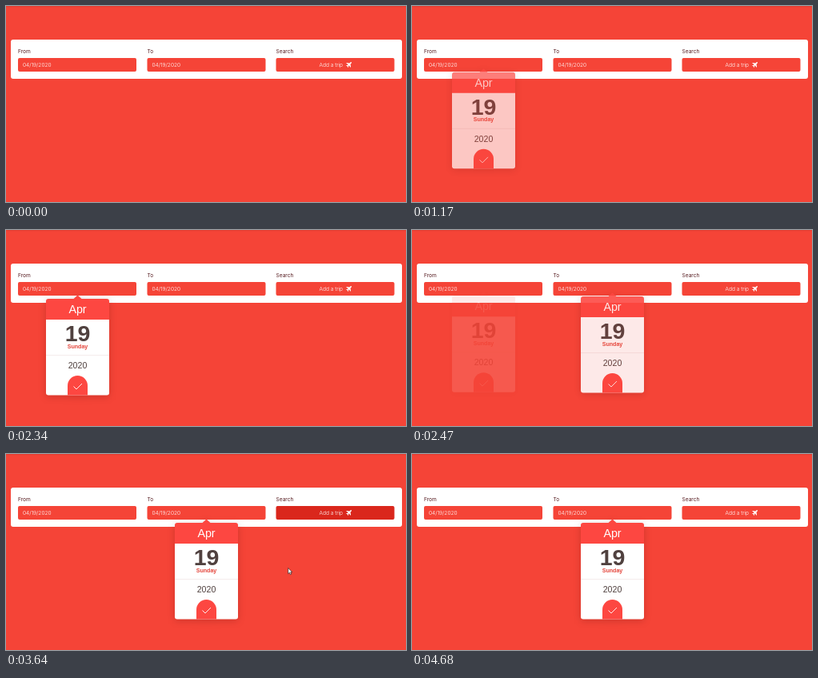
Recreate the animation shown at these times as an HTML page. Size 500 by 245 pixels, loop 5460 ms.

```html
<!DOCTYPE html>
<html lang="en">
<head>
<meta charset="utf-8">
<title>Trip search</title>
<style>
  html, body { margin: 0; width: 100%; height: 100%; overflow: hidden; background: #f54437; }
  svg { display: block; width: 100%; height: 100%; }
  .form { font: 300 6.6px Inter, sans-serif; }
  .label { fill: #561c20; font-weight: 400; }
  .field { fill: #f54437; }
  .value { fill: #fff; }
  .card { font-family: "Liberation Sans", Arial, sans-serif; text-anchor: middle;
    filter: drop-shadow(0 2px 5px rgba(60, 0, 0, .2)); }
  .accent { fill: #fd4741; }
  .ink { fill: #50413f; }
</style>
</head>
<body>
<svg viewBox="0 0 500 245">
  <defs>
    <linearGradient id="edge" x2="0" y2="1">
      <stop stop-color="#dd3c31"/>
      <stop offset="1" stop-color="#f54437"/>
    </linearGradient>
  </defs>
  <rect width="500" height="245" fill="#f54437"/>
  <rect width="500" height="2" fill="url(#edge)"/>
  <rect x="6" y="42" width="489" height="49" rx="3" fill="#fff"/>
  <g class="form" id="form"></g>
  <path fill="#fff" transform="translate(429 73) rotate(-45)"
    d="M4 0Q4-.8 2.7-.8H1.3L-.7-3.6H-1.7L-.9-.8H-2.3L-3.1-1.8H-3.8L-3.3 0L-3.8 1.8H-3.1L-2.3.8H-.9L-1.7 3.6H-.7L1.3.8H2.7Q4 .8 4 0Z"/>
  <g id="cards"></g>
  <g fill="#fff" stroke="#3a2222" stroke-width=".7" stroke-linejoin="round">
    <path id="arrow" d="M0 0V7.2L1.7 5.7L2.8 8.2L4.1 7.6L3 5.2H5.2Z"/>
    <path id="hand" d="M-.7 4.6V.5Q0-.5.7.5V3L3.3 3.6Q4 3.9 3.9 4.7L3.3 8.6H0L-2.3 5.6Q-2.3 4.5-1.5 4.8Z"/>
  </g>
</svg>
<script>
const STEP = 130, LOOP = 5460, FADE = 200;
const OPEN_FROM = 1090, SWITCH = 2350;
const $ = id => document.getElementById(id);

const fields = [[15, "From", "04/19/2020"], [176.5, "To", "04/19/2020"], [337.5, "Search", "Add a trip"]];
$("form").innerHTML = fields.map(([x, label, value], i) => `
  <text class="label" x="${x}" y="59">${label}</text>
  <rect class="field" x="${x}" y="65" width="148" height="17" rx="2"/>
  <text class="value" x="${x + (i === 2 ? 54 : 6)}" y="76">${value}</text>`).join("");
const button = document.querySelectorAll(".field")[2];

function addCard(x) {
  const g = document.createElementNS("http://www.w3.org/2000/svg", "g");
  g.setAttribute("class", "card");
  g.innerHTML = `
    <rect x="-39.5" y="86" width="79" height="120.5" rx="3" fill="#fff"/>
    <path class="accent" d="M-39.5 112V89Q-39.5 86-36.5 86H-5L0 81.5L5 86H36.5Q39.5 86 39.5 89V112Z"/>
    <text y="104" font-size="14.3" fill="#fff">Apr</text>
    <text class="ink" y="139.3" font-size="28.5" font-weight="700">19</text>
    <text y="147.5" font-size="7.1" font-weight="700" fill="#e4453b">Sunday</text>
    <path d="M-39.5 156.5H39.5" stroke="#f1e8e7" stroke-width=".8"/>
    <text class="ink" y="172.7" font-size="10.6">2020</text>
    <path class="accent" d="M-12.5 206.5V194.5A12.5 12.5 0 0 1 12.5 194.5V206.5Z"/>
    <path d="M-5 195.5L-1.5 199L5.5 192" fill="none" stroke="#fff" stroke-width=".9"/>`;
  $("cards").append(g);
  return { g, x };
}
const from = addCard(89.5), to = addCard(250.5);

const clamp = v => Math.max(0, Math.min(1, v));
const fade = (t, start) => 1 - (1 - clamp((t - start) / FADE)) ** 2.36;

function showCard({ g, x }, o) {
  const lift = o < 1 ? 1.2 * o - 4 : 0;
  g.setAttribute("opacity", o);
  g.setAttribute("transform", `translate(${x} ${lift})`);
}

// Each visit of the pointer: shape, then [time, x, y] stops
const visits = [
  ["arrow", [1690, 205, 92], [1820, 231.5, 86.5], [1950, 238, 84]],
  ["hand", [2990, 357, 76.5], [3250, 372, 73], [3510, 372, 73]],
  ["arrow", [3640, 352.7, 142.5], [4160, 356, 185], [4290, 357, 200], [4680, 360, 250]]
];

function showPointer(t) {
  for (const id of ["arrow", "hand"]) $(id).setAttribute("visibility", "hidden");
  for (const [id, ...stops] of visits) {
    const i = stops.findIndex((s, n) => n && t >= stops[n - 1][0] && t <= s[0]);
    if (i < 1) continue;
    const [t0, x0, y0] = stops[i - 1], [t1, x1, y1] = stops[i];
    const k = (t - t0) / (t1 - t0);
    $(id).setAttribute("transform", `translate(${x0 + (x1 - x0) * k} ${y0 + (y1 - y0) * k})`);
    $(id).setAttribute("visibility", "visible");
  }
}

function buttonColor(t) {
  const k = clamp((t - 2990) / 200) * (1 - clamp((t - 3640) / 200));
  const mix = (a, b) => Math.round(a + (b - a) * k);
  return `rgb(${mix(245, 218)},${mix(68, 39)},${mix(55, 28)})`;
}

function draw(now) {
  const t = Math.floor((now % LOOP) / STEP) * STEP;
  showCard(from, fade(t, OPEN_FROM) - fade(t, SWITCH));
  showCard(to, fade(t, SWITCH));
  button.style.fill = buttonColor(t);
  showPointer(t);
}

const start = performance.now();
function tick() {
  draw(performance.now() - start);
  requestAnimationFrame(tick);
}
tick();
</script>
</body>
</html>
```
